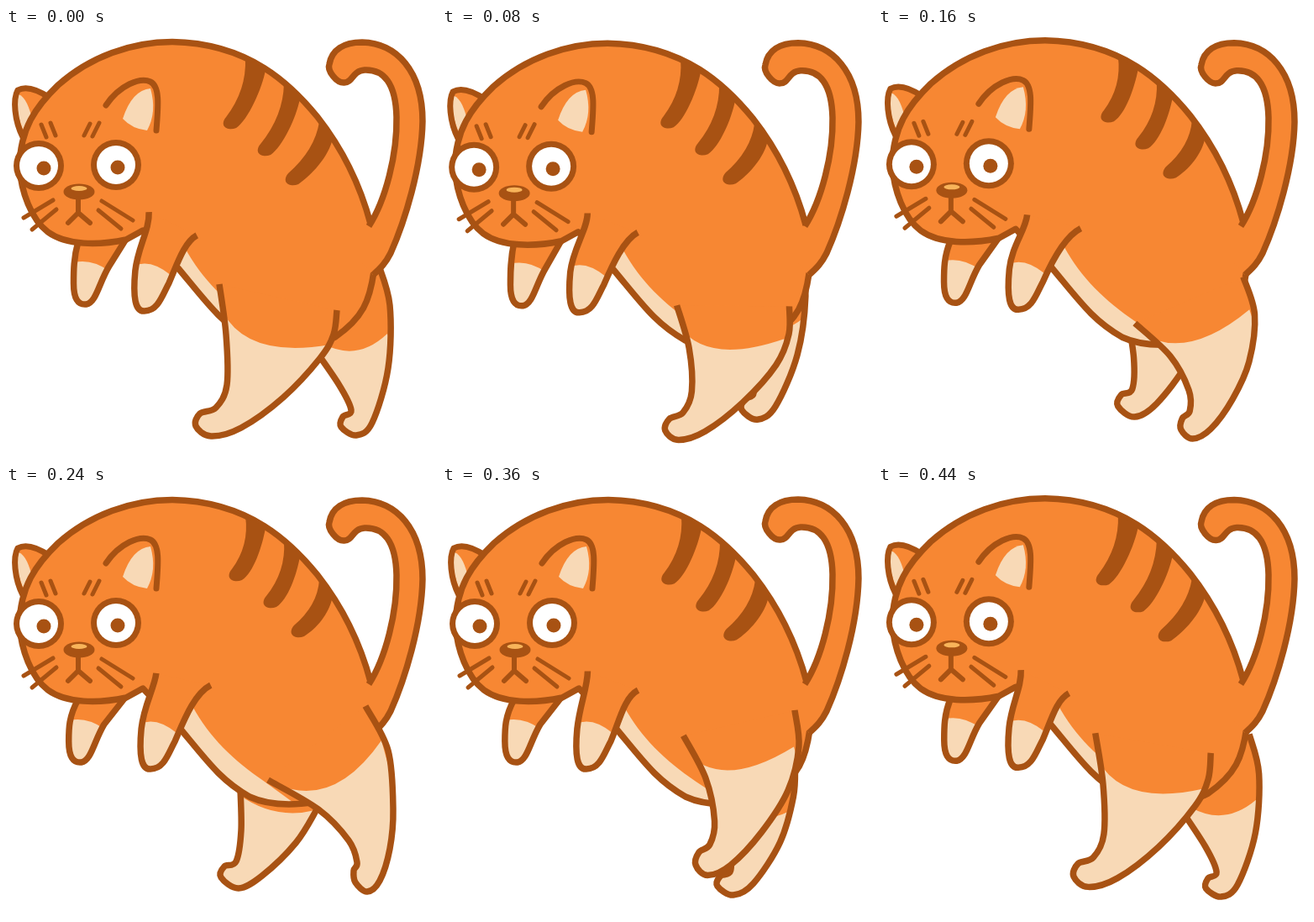
Write an HTML page with a canvas that moves like this. It is 512 by 512 pixels and loops after 480 ms.

```html
<!DOCTYPE html>
<html lang="en">
<head>
<meta charset="utf-8">
<title>Walking cat</title>
<style>
html, body { margin: 0; height: 100%; overflow: hidden; background: #fff; }
canvas { display: block; }
</style>
</head>
<body>
<canvas id="stage" width="512" height="512"></canvas>
<script>
const ctx = document.getElementById('stage').getContext('2d');
const BROWN = '#a85213', ORANGE = '#f78733', CREAM = '#f8d9b6';
const STEPS = 12, STEP_MS = 40;
const { sin, cos, PI } = Math;

// Each leg swings between two extreme poses. An outline runs from the front of
// the thigh, round the foot and up the back; an edge tops the cream part.
const NEAR_LEG = {
  bow: 0.16,
  outline: {
    back: [254,305, 262,365, 263,425, 250,452, 231,459, 226,474,
           244,486, 280,476, 330,440, 374,393, 390,365, 394,336],
    front: [312,350, 372,385, 408,422, 418,448, 414,458, 416,472,
            430,483, 445,470, 457,432, 461,385, 455,315, 428,262]
  },
  edge: { back: [258,338, 288,394, 386,377], front: [322,355, 390,385, 447,303] }
};
const FAR_LEG = {
  bow: 0.04,
  outline: {
    back: [279,360, 280,410, 274,447, 260,453, 256,466,
           277,479, 305,464, 345,425, 370,385, 385,355],
    front: [360,372, 396,424, 411,455, 401,463, 399,475,
            417,485, 436,470, 455,405, 457,330, 443,280]
  },
  edge: { back: [278,368, 320,398, 368,386], front: [378,376, 418,398, 454,364] }
};

// Blends the poses; the leg drops while moving forward and lifts on the way back.
function swing({ back, front }, phase, bow) {
  const k = (1 - cos(phase)) / 2, s = sin(phase);
  const mixed = back.map((v, i) => v + (front[i] - v) * k);
  return mixed.map((v, i) => {
    const y = mixed[i | 1];
    return i % 2
      ? v - 8 * s * s + (24 - (y - 300) * 0.06) * s
      : v + (380 - y) * bow * s * s + 4 * s;
  });
}

// Smooth open curve through the points.
function curve(p) {
  const n = p.length / 2;
  const at = (i, axis) => p[2 * Math.max(0, Math.min(n - 1, i)) + axis];
  let d = `M${p[0]} ${p[1]}`;
  for (let i = 0; i < n - 1; i++) {
    const c = [0, 1].map(a => at(i, a) + (at(i + 1, a) - at(i - 1, a)) / 6);
    const e = [0, 1].map(a => at(i + 1, a) - (at(i + 2, a) - at(i, a)) / 6);
    d += `C${c} ${e} ${at(i + 1, 0)} ${at(i + 1, 1)}`;
  }
  return d;
}

function fill(d, color) {
  ctx.fillStyle = color;
  ctx.fill(new Path2D(d));
}
function line(d, width = 7.5, cap = 'butt') {
  ctx.lineWidth = width;
  ctx.lineCap = cap;
  ctx.lineJoin = 'round';
  ctx.strokeStyle = BROWN;
  ctx.stroke(new Path2D(d));
}
function oval(x, y, rx, ry, color) {
  ctx.beginPath();
  ctx.ellipse(x, y, rx, ry, 0, 0, 7);
  ctx.fillStyle = color;
  ctx.fill();
}
function shifted(x, y, draw) {
  ctx.save();
  ctx.translate(x, y);
  draw();
  ctx.restore();
}
// Orange shape with a cream patch inside it and an open outline.
function limb(d, patch) {
  fill(d, ORANGE);
  ctx.save();
  ctx.clip(new Path2D(d));
  fill(patch, CREAM);
  ctx.restore();
  line(d);
}

function leg({ outline, edge, bow }, phase) {
  const [x1, y1, cx, cy, x2, y2] = swing(edge, phase, bow);
  limb(curve(swing(outline, phase, bow)),
    `M${x1} ${y1}Q${cx} ${cy} ${x2} ${y2}L${x2 + 60} 520H${x1 - 80}Z`);
}

function farArm(x, y) {
  limb(`M86 254C${82 + x} ${275 + y} ${82 + x} ${290 + y} ${82 + x} ${305 + y}
    C${82 + x} ${323 + y} ${87 + x} ${331 + y} ${97 + x} ${330 + y}
    C${109 + x} ${328 + y} ${112 + x} ${305 + y} ${124 + x} ${285 + y}L145 248`,
    `M${76 + x} ${282 + y}Q${100 + x} ${273 + y} ${124 + x} ${290 + y}V345H70Z`);
}

function nearArm(twist, x, y) {
  limb(`M${170 + 9 * twist} ${219 + 4 * twist}
    C${171 + 6 * twist} 240 ${155 + x} ${260 + y} ${152 + x} ${288 + y}
    C${149 + x} ${320 + y} ${152 + x} ${337 + y} ${163 + x} ${336 + y}
    C${179 + x} ${336 + y} ${184 + x} ${318 + y} ${192 + x} ${303 + y}
    C${202 + x} ${280 + y} ${212 + 12 * twist} ${255 - 8 * twist}
     ${227 + 17 * twist} ${247 - 10 * twist}`,
    `M${144 + x} ${286 + y}Q${166 + x} ${270 + y} ${194 + x} ${293 + y}V350H140Z`);
}

function farEar() {
  const d = 'M20 130C10 110 8 85 14 74C25 68 40 75 52 83';
  fill(d + 'L40 120Z', ORANGE);
  fill('M15 79C23 82 28 95 31 108L22 124C14 110 12 90 15 79Z', CREAM);
  line(d, 7);
}

// From the back line (a to b) down to a rounded tip t.
function stripe(ax, ay, bx, by, tx, ty) {
  fill(`M${ax} ${ay}Q${(ax + tx) / 2 + 13} ${(ay + ty) / 2 + 3} ${tx} ${ty}
    C${tx - 9} ${ty + 11} ${tx + 2} ${ty + 17} ${tx + 12} ${ty + 13}
    C${tx + 26} ${ty + 4} ${bx - 4} ${by + 22} ${bx} ${by}Z`, BROWN);
}

function body(twist) {
  const x = 9 * twist - 9, dx = 7 * twist, dy = -7 * twist;
  limb(`M438 290C433 325 425 345 392 368C370 380 320 384 290 370
    C255 350 240 328 205 286L163 241L143 252C110 259 72 259 50 243
    C30 228 18 195 16 165C17 120 35 94 62 68C100 34 150 16.5 198 16.5
    C290 18 340 68 371 106C400 143 422 188 434 233`,
    `M${222 + x} 262C${243 + x} 300 ${270 + x} 326 ${308 + x} 352L360 390H260L190 285Z`);
  stripe(285, 36, 309, 50, 262 + dx, 106 + dy);
  stripe(331, 66, 350, 84, 303 + dx, 138 + dy);
  stripe(373, 112, 389, 131, 336 + dx, 173 + dy);
}

function tail(y) {
  const d = `M432 236C452 205 466 150 465 ${105 + y}C464 ${65 + y} 450 ${48 + y} 427 ${49 + y}
    C412 ${50 + y} 413 ${64 + y} 403 ${64 + y}C394 ${65 + y} 382 ${50 + y} 385 ${42 + y}
    C388 ${25 + y} 402 ${16 + y} 424 ${16 + y}C465 ${17 + y} 496 ${50 + y} 496 ${110 + y}
    C495 165 475 230 458 268C452 280 446 286 437 294`;
  fill(d + 'L424 280V238Z', ORANGE);
  line(d);
}

function eye(x, y, pupilX) {
  oval(x, y, 30, 30, BROWN);
  oval(x, y, 23, 23, '#fff');
  oval(pupilX, y + 3, 8.5, 8.5, BROWN);
}

function face() {
  fill('M139 108Q150 74 172 72Q180 100 168 122Q150 120 139 108Z', CREAM);
  line('M119 92C135 68 160 58 172 64C184 70 181 95 179 122', 7, 'round');
  line('M42 115L48 130M53 113L59 128M100 129L107 114', 0.01);
  line('M42 115L48 130M53 113L59 128M100 114L93 128M111 113L103 129', 5, 'round');
  eye(39, 164, 45);
  eye(131, 163, 133);
  oval(87, 195, 18.5, 9.5, BROWN);
  oval(87, 191, 9.5, 3, '#f8b45a');
  line('M86 203V219M74 232L86 220L100 232', 6, 'round');
  line('M114 206L151 229M110 217L137 239M56 205L21 226M60 216L31 240', 5, 'round');
}

function draw(phase) {
  const bob = 2 * sin(2 * phase);
  const twist = (1 + cos(phase - 2.9)) / 2;
  const reach = 5.5 + 5 * cos(phase - 3.9);
  ctx.fillStyle = '#fff';
  ctx.fillRect(0, 0, 512, 512);
  leg(FAR_LEG, phase + PI);
  farArm(-0.8 * reach, bob - 1);
  shifted(-bob / 2, bob, () => { farEar(); body(twist); });
  tail(1 + sin(phase));
  leg(NEAR_LEG, phase);
  nearArm(twist, reach, bob + 1);
  shifted(-bob / 2, bob, face);
}

const start = performance.now();
function tick() {
  const step = Math.floor((performance.now() - start) / STEP_MS) % STEPS;
  draw(step / STEPS * 2 * PI);
  requestAnimationFrame(tick);
}
tick();
</script>
</body>
</html>
```
